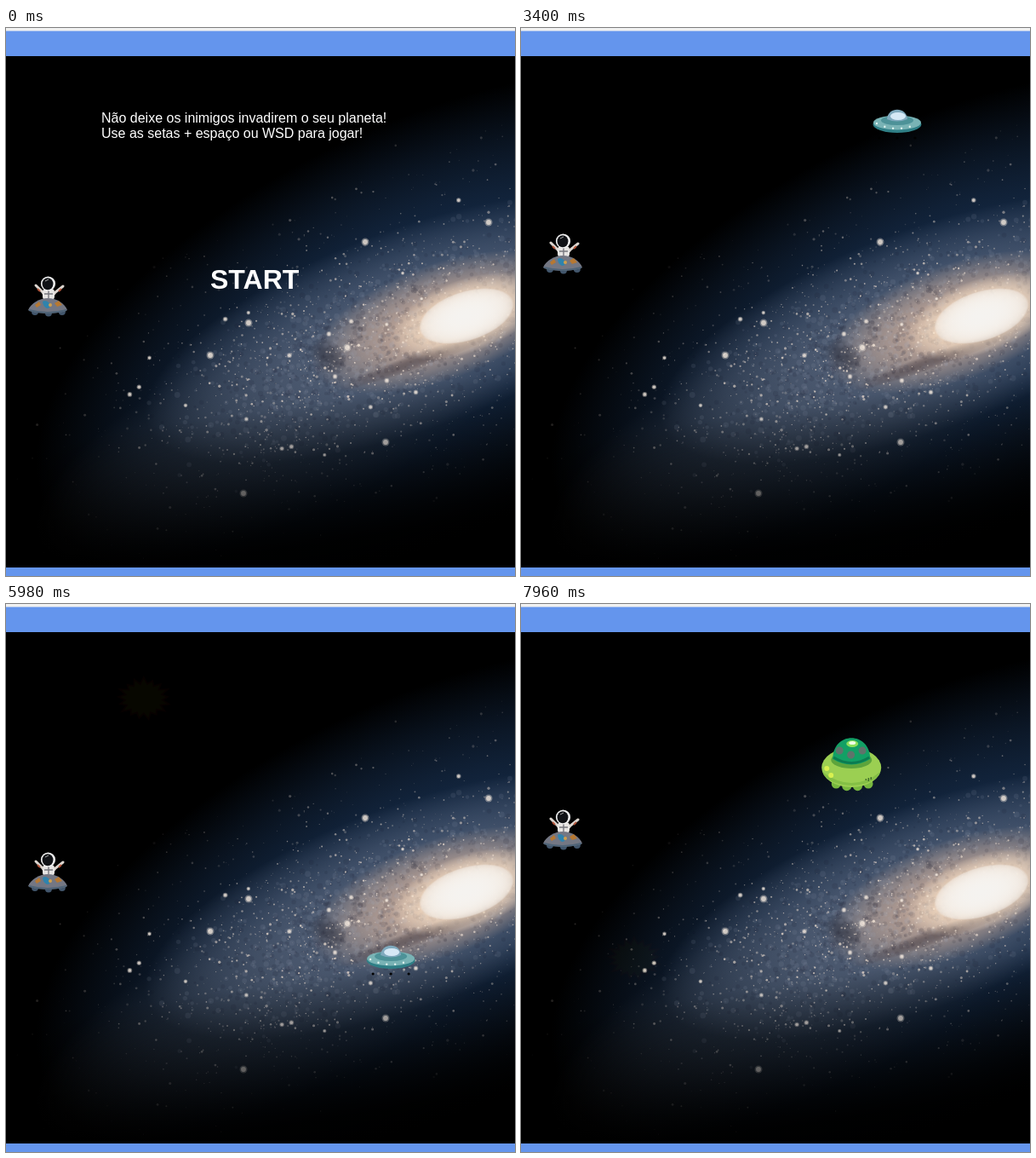
Animation, 598 px wide and 643 px high, one loop 8000 ms. Source, as an HTML page with a canvas:

```html
<!DOCTYPE html>
<html lang="pt">
<head>
<meta charset="utf-8">
<title>Jogo espacial</title>
<style>
html, body { margin: 0; width: 100%; height: 100%; overflow: hidden; background: #000; }
canvas, svg { position: absolute; left: 0; top: 0; display: block; }
text { font-family: "Liberation Sans", Arial, sans-serif; fill: #fff; }
.boom { fill: #fff500; stroke: #e32a00; stroke-width: 1.8px; }
.dots { fill: none; stroke-linecap: round; }
</style>
</head>
<body>
<canvas id="sky" width="598" height="643"></canvas>
<svg width="598" height="643" viewBox="0 0 598 643">
  <defs>
    <g id="saucer">
      <path class="dots" d="M-21 20H22" stroke="#000" stroke-width="3.2" stroke-dasharray="0 21"/>
      <ellipse cy="4" rx="28.5" ry="10" fill="#2f7f86"/>
      <ellipse cy="2" rx="28" ry="8.5" fill="#79b3b5"/>
      <ellipse cy="-.5" rx="19" ry="5.5" fill="#4d9298"/>
      <path d="M-12 -2C-11 -17 11 -17 12 -2Q0 3 -12 -2Z" fill="#7fa9bd"/>
      <ellipse cx="1" cy="-5.5" rx="9" ry="4.5" fill="#d5e8f5"/>
      <path class="dots" d="M-24 3Q0 15 24 3" stroke="#dff3ee" stroke-width="2.4" stroke-dasharray="0 10"/>
    </g>
    <g id="laser">
      <rect y="-6.5" width="34" height="13" rx="5" fill="#c91400"/>
      <rect x="1.5" y="-5" width="31" height="10" rx="4" fill="#f02000"/>
      <path d="M4 1L30 0" stroke="#ffe0d6" stroke-width="3" stroke-linecap="round"/>
    </g>
  </defs>

  <g id="intro">
    <text x="112" y="111" font-size="16">Não deixe os inimigos invadirem o seu planeta!</text>
    <text x="112" y="129" font-size="16">Use as setas + espaço ou WSD para jogar!</text>
    <text x="240" y="306" font-size="32" font-weight="bold">START</text>
  </g>

  <g id="player">
    <path d="M9 11L17 19L20 24M41 12L32 19L28 24" fill="none" stroke="#ddd6d0" stroke-width="3" stroke-linecap="round"/>
    <path d="M11 15L14 18M39 15L36 18" stroke="#b5573c" stroke-width="2"/>
    <rect x="17" y="15" width="14" height="13" rx="4" fill="#e6e4e2"/>
    <path d="M19 21H29M24 17V26" stroke="#77777e" stroke-width="1.4"/>
    <circle cx="23.5" cy="9" r="8.6" fill="#f0f0f0"/>
    <ellipse cx="23" cy="9.2" rx="6.4" ry="7" fill="#101216"/>
    <path d="M20 6L24 4" stroke="#aaa"/>
    <path class="dots" d="M8 42Q24 45 40 42" stroke="#42566c" stroke-width="8" stroke-dasharray="0 16"/>
    <path d="M0 40C3 32 14 26 23 26C33 26 43 32 46 40C37 45 9 45 0 40Z" fill="#747783"/>
    <path d="M1 40Q23 46 45 40" fill="none" stroke="#4f6478" stroke-width="2"/>
    <path d="M8 34L13 30L15 34L10 37ZM31 32L36 29L40 34L34 36Z" fill="#b67832"/>
    <path d="M17 30Q21 27 25 32Q27 38 22 38Q17 35 17 30Z" fill="#2f83ad"/>
    <circle cx="26" cy="34" r="2" fill="#d0a04c"/>
  </g>

  <g id="foeA"><use href="#saucer"/></g>
  <g id="foeB"><use href="#saucer"/></g>
  <g id="foeC">
    <path class="dots" d="M-18 22Q0 28 20 22" stroke="#78b83f" stroke-width="11" stroke-dasharray="0 12.8"/>
    <ellipse cy="3" rx="35" ry="23" fill="#9bcf52"/>
    <path d="M-34 8Q0 34 34 8C27 29 -27 29 -34 8Z" fill="#84bf45"/>
    <ellipse cy="-6" rx="24" ry="10" fill="#5da43c"/>
    <path d="M-22 -7C-22 -40 22 -40 22 -7Q0 6 -22 -7Z" fill="#12a065"/>
    <path d="M-21 -9Q0 4 21 -9" fill="none" stroke="#0b7c51" stroke-width="3"/>
    <path class="dots" d="M-14 -17Q-1 -7 13 -17" stroke="#5f736b" stroke-width="9" stroke-dasharray="0 14.5"/>
    <ellipse cx="1" cy="-25" rx="7" ry="4" fill="#8be05b"/>
    <ellipse cx="1" cy="-26" rx="4" ry="2" fill="#efffe8"/>
    <path class="dots" d="M-29 4L-24 12" stroke="#d8f050" stroke-width="6" stroke-dasharray="0 9.4"/>
    <path d="M17 18V16M20 19V15M23 17V14" stroke="#355f25" stroke-width="1.2"/>
  </g>
  <polygon id="boomA" class="boom"/>
  <polygon id="boomB" class="boom"/>
  <g id="shotA"><use href="#laser"/></g>
  <g id="shotB"><use href="#laser"/></g>

  <path id="arrow" d="M0 0V16.5L3.8 13L6.3 18.6L8.8 17.5L6.3 12H11.5Z" fill="#fff" stroke="#000"/>
  <path id="hand" d="M-1.5 1Q0 -.5 1.5 1V8Q4 6.5 5 8.5Q8 7.5 8.5 9.5Q11 9 11 12V17Q10 20 9 23H-1Q-3 19 -6 14Q-6 11 -3.5 12L-1.5 14Z" fill="#fff" stroke="#000"/>
</svg>
<script>
const LOOP = 8000, TICK = 69;
const $ = id => document.getElementById(id);
const clamp = v => Math.max(0, Math.min(1, v));

function drawSky() {
  const c = $('sky').getContext('2d');
  let seed = 41;
  const rnd = () => (seed = seed * 16807 % 2147483647) / 2147483647;
  const bell = () => (rnd() + rnd() + rnd() - 1.5) / 1.5;

  // Tilted elliptical glow whose strength falls as (1 - r²)^power
  function glow(x, y, rx, ry, deg, rgb, alpha, power = 1) {
    const g = c.createRadialGradient(0, 0, 0, 0, 0, 1);
    for (let r = 0; r <= 20; r++) {
      const a = alpha * (1 - (r / 20) ** 2) ** power;
      g.addColorStop(r / 20, `rgba(${rgb},${a.toFixed(3)})`);
    }
    c.save();
    c.translate(x, y);
    c.rotate(deg * Math.PI / 180);
    c.scale(rx, ry);
    c.fillStyle = g;
    c.fillRect(-1, -1, 2, 2);
    c.restore();
  }
  function dot(x, y, r, rgb, alpha) {
    c.fillStyle = `rgba(${rgb},${alpha.toFixed(3)})`;
    c.beginPath();
    c.arc(x, y, r, 0, 7);
    c.fill();
  }
  const tilt = -22 * Math.PI / 180, cos = Math.cos(tilt), sin = Math.sin(tilt);
  function scatter(n, x, y, rx, ry, paint) {
    for (let i = 0; i < n; i++) {
      const u = bell(), v = bell();
      paint(x + u * rx * cos - v * ry * sin, y + u * rx * sin + v * ry * cos, Math.hypot(u, v));
    }
  }

  c.fillStyle = '#000';
  c.fillRect(0, 0, 598, 643);
  glow(500, 350, 500, 240, -25, '24,48,80', 1, 1.1);
  glow(330, 465, 320, 110, -25, '62,66,72', .4);
  glow(480, 352, 335, 118, -20, '86,99,122', .95);
  glow(510, 345, 160, 68, -20, '212,178,156', .85);

  scatter(1600, 450, 365, 330, 115, (x, y) => {
    const dark = rnd() < .45;
    dot(x, y, 1 + rnd() * 2.5, dark ? '14,22,38' : '165,175,195', .11);
  });
  glow(378, 385, 26, 18, 40, '25,28,42', .45);
  glow(490, 388, 110, 9, -20, '62,52,58', .5);

  const shade = c.createLinearGradient(345, 440, 370, 605);
  for (let i = 0; i <= 4; i++) shade.addColorStop(i / 4, `rgba(0,0,0,${.92 * i / 4})`);
  c.fillStyle = shade;
  c.fillRect(0, 33, 598, 600);

  const starlight = y => 1 - .65 * clamp((y - 430) / 120);
  scatter(1900, 430, 370, 500, 235, (x, y, r) => {
    dot(x, y, .4 + rnd() * rnd() * 1.4, '228,214,202', clamp(1.1 - r) * starlight(y) * (.25 + rnd() * .75));
  });
  glow(541, 338, 94, 43, -20, '252,228,202', 1, .9);
  glow(541, 338, 58, 29, -18, '245,243,240', 1, .3);

  const bigStar = (x, y, r) => {
    dot(x, y, r, '235,225,215', .4 * starlight(y));
    dot(x, y, r * .65, '248,236,225', .7 * starlight(y));
  };
  scatter(24, 370, 390, 420, 190, (x, y) => bigStar(x, y, 2 + rnd()));
  for (const [x, y] of [[422, 251], [567, 228], [401, 375], [446, 486], [279, 546], [285, 346], [240, 384]])
    bigStar(x, y, 4.5);

  c.fillStyle = '#6495ed';
  c.fillRect(0, 0, 598, 33);
  c.fillRect(0, 633, 598, 10);
  c.fillStyle = '#f1f1f1';
  c.fillRect(0, 0, 598, 3.5);
}

function shapeBooms() {
  const spikes = Array.from({ length: 34 }, (_, i) => {
    const a = i * Math.PI / 17 - Math.PI / 2;
    const k = i % 2 ? .69 : .94 + .06 * Math.cos(i * 2);
    return `${(32 * k * Math.cos(a)).toFixed(1)},${(25 * k * Math.sin(a)).toFixed(1)}`;
  });
  for (const b of document.querySelectorAll('.boom')) b.setAttribute('points', spikes.join(' '));
}

// Key presses: direction, first time, gap, count
const presses = [
  [-1, 1990, 130, 2], [-1, 2320, 0, 1], [1, 2850, 350, 2],
  [-1, 3610, 210, 3], [1, 5270, 200, 6], [-1, 7410, 170, 3]];
function playerY(t) {
  let y = 291;
  for (const [dir, first, gap, count] of presses)
    for (let i = 0; i < count; i++) if (t >= first + i * gap) y += dir * 50;
  return y;
}

const foes = [
  { id: 'A', born: 3130, x: 471.5, y: 109, accel: 0, fired: 4568, hit: 4800 },
  { id: 'B', born: 5470, x: 520, y: 414, accel: 6.5e-5, fired: 6641, hit: 6790 },
  { id: 'C', born: 7270, x: 493, y: 189, accel: 6.5e-5, hit: Infinity }];

function foeX(f, t) {
  const s = Math.min(t, f.hit) - f.born;
  return f.x - .107 * s - f.accel * s * s;
}

function place(id, x, y, opacity) {
  $(id).setAttribute('transform', `translate(${x} ${y})`);
  $(id).setAttribute('opacity', Number(opacity));
}

function drawCursor(t) {
  const u = clamp(Math.floor((t - 360) / 70) / 8);
  const ease = u * (2 - u);
  const x = t < 1460 ? 541 - 262 * ease : 438, y = 630 - 331 * ease;
  const onButton = t >= 850 && t < 1260;
  place('arrow', x, y, t >= 360 && t < 1530 && !onButton);
  place('hand', x, y, onButton);
}

function drawFoe(f, q) {
  const x = foeX(f, q), age = q - f.hit;
  place('foe' + f.id, x, f.y, q >= f.born && age < 0);
  if (!f.fired) return;
  // The blast hangs a moment, then keeps drifting while it fades
  const drift = .1338 * Math.max(0, age - 180);
  place('boom' + f.id, x - drift, f.y + 2, age >= 0 ? clamp(1 - age / 1190) : 0);
  const shotX = 180 + .52 * (q - f.fired);
  place('shot' + f.id, shotX, f.y + (f.id === 'A' ? 15 : 9.5), shotX >= 180 && shotX < 541);
}

function render(t) {
  $('intro').setAttribute('opacity', t < 1120 ? 1 : 0);
  place('player', 26, playerY(t), 1);
  drawCursor(t);
  const q = 3130 + TICK * Math.floor((t - 3120) / TICK);
  for (const f of foes) drawFoe(f, q);
}

drawSky();
shapeBooms();
const start = performance.now();
(function tick() {
  render((performance.now() - start) % LOOP);
  requestAnimationFrame(tick);
})();
</script>
</body>
</html>
```
